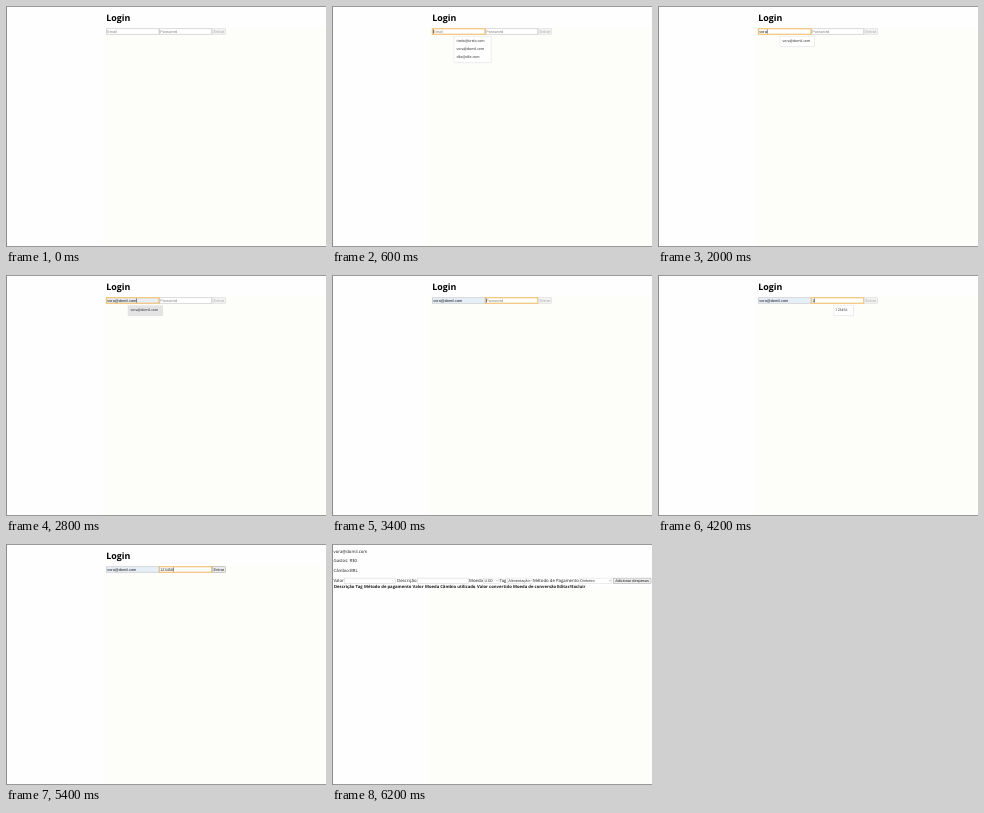
These frames come from a looping animation (320x241 px, 8000 ms). An HTML page:

```html
<!DOCTYPE html>
<html lang="pt">
<head>
<meta charset="utf-8">
<title>Login</title>
<style>
html, body { margin: 0; width: 100%; height: 100%; overflow: hidden; background: #fefefe; }
svg { display: block; width: 100vw; height: 100vh; }
text { white-space: pre; text-rendering: geometricPrecision; }
.ui { font-family: "Open Sans", "Noto Sans", sans-serif; }
.field { font-family: "Liberation Sans", Arial, sans-serif; }
</style>
</head>
<body>
<svg id="stage" viewBox="0 0 320 241" preserveAspectRatio="none"></svg>
<script>
const LOOP = 8000;
const EMAIL = "vora@domil.com";
const PASS = "123456";
const OTHERS = ["tirelo@tirelo.com", "dile@dile.com"];
const INK = "#1c1c1c", HINT = "#858585", LINE = "#b4b4b4";
const FIELD = 3.87, BODY = 4.3;
const stage = document.getElementById("stage");

function add(parent, tag, attrs, content) {
  const el = document.createElementNS("http://www.w3.org/2000/svg", tag);
  for (const k in attrs) el.setAttribute(k, attrs[k]);
  if (content) el.textContent = content;
  return parent.appendChild(el);
}
const group = parent => add(parent, "g", {});
const box = (p, x, y, width, height, fill, stroke = "none", sw = 0.5) =>
  add(p, "rect", { x, y, width, height, fill, stroke, "stroke-width": sw });
const label = (p, x, y, size, str, fill = INK, weight = 400, cls = "ui") =>
  add(p, "text", { x, y, class: cls, "font-size": size, "font-weight": weight, fill }, str);
const fieldText = (p, x, y, str, fill = INK) => label(p, x, y, FIELD, str, fill, 400, "field");
const show = (el, on) => el.setAttribute("visibility", on ? "inherit" : "hidden");
const style = (el, attrs) => { for (const k in attrs) el.setAttribute(k, attrs[k]); };

// Page
box(stage, 0, 0, 320, 241, "#fefefe");
box(stage, 97, 46, 223, 194, "#fdfdf9");
const login = group(stage), wallet = group(stage);
box(stage, 0, 0, 320, 1, "#999");
box(stage, 0, 240, 320, 1, "#999");
box(stage, 0, 0, 1, 241, "#8c8c8c");

// Login form
box(login, 97, 22, 223, 24, "#fdfdf9");
label(login, 100.2, 14.6, 8.87, "Login", "#000", 700);

function input(x, width, hint) {
  const frame = box(login, x, 22.8, width, 5.4, "#fff", LINE);
  const text = fieldText(login, x + 1, 26.9, "");
  const caret = box(login, 0, 23.5, 0.5, 4, "#111");
  return (value, focused, filled) => {
    text.textContent = value || hint;
    text.setAttribute("fill", value ? INK : HINT);
    style(frame, {
      fill: filled ? "#e6eff8" : "#fff",
      stroke: focused ? "#efb04a" : LINE,
      "stroke-width": focused ? 0.9 : 0.5
    });
    show(caret, focused);
    caret.setAttribute("x", x + 1 + (value ? text.getComputedTextLength() + 0.1 : -0.2));
  };
}
const setPass = input(153.2, 52.6, "Password");
const setEmail = input(100.3, 52.7, "Email");

const button = box(login, 206.2, 22.8, 13.3, 5.4, "#f0f0f0", "#d0d0d0");
const buttonText = fieldText(login, 207.6, 26.9, "Entrar");

function menu(x, width, rows, size) {
  const g = group(login);
  const height = rows.length * 8 + 2;
  box(g, x + 0.4, 31.1, width, height, "#e9e9e9");
  const face = box(g, x, 30.6, width, height, "#fff", "#dedede", 0.4);
  rows.forEach((row, i) => label(g, x + 2.5, 36.4 + i * 8, size, row));
  return { g, face };
}
const allMenu = menu(122, 37, [OTHERS[0], EMAIL, OTHERS[1]], 3.53);
const oneMenu = menu(122, 34.6, [EMAIL], 3.53);
const passMenu = menu(175.2, 20, [PASS], 3.4);

// Expenses page
label(wallet, 1.5, 8.8, BODY, EMAIL);
label(wallet, 1.5, 18.3, BODY, "Gastos: R$0");
label(wallet, 1.5, 28, BODY, "Câmbio:BRL");
[[1.5, "Valor"], [65, "Descrição"], [137, "Moeda"], [167.6, "Tag"], [201, "Método de Pagamento"]]
  .forEach(([x, str]) => label(wallet, x, 38, BODY, str));

for (const x of [12.6, 85.6]) box(wallet, x, 34.1, 51, 5.2, "#fff", "#c4c4c4", 0.4);

[[151.6, 15.4, "USD"], [175.3, 25, "Alimentação"], [247.3, 32.6, "Dinheiro"]].forEach(([x, w, str]) => {
  box(wallet, x, 34.1, w, 5.2, "#fff", "#d2d2d2", 0.4);
  fieldText(wallet, x + 1, 38, str, "#333");
  const cx = x + w - 1.7;
  add(wallet, "path", { d: `M${cx - 0.8} 36.3l.8 .8l.8-.8`, fill: "none", stroke: "#333", "stroke-width": 0.4 });
});
box(wallet, 281.2, 34.1, 37.8, 5.2, "#efefef", "#8c8c8c", 0.4);
fieldText(wallet, 283.2, 38, "Adicionar despesas");

[[2, "Descrição"], [23.6, "Tag"], [32, "Método de pagamento"], [80.6, "Valor"], [93, "Moeda"],
 [108.2, "Câmbio utilizado"], [145, "Valor convertido"], [181, "Moeda de conversão"], [225, "Editar/Excluir"]]
  .forEach(([x, str]) => label(wallet, x, 44.4, 4.21, str, INK, 700));

// Typing runs one key per 200 ms
const typed = (t, start) => Math.max(0, Math.floor((t - start) / 200) + 1);

function render(t) {
  const done = t >= 6200, picked = t >= 2800, onPass = t >= 3200;
  show(login, !done);
  show(wallet, done);
  if (done) return;

  const keys = t < 1600 ? 0 : Math.min(4, typed(t, 1600) + 1);
  setEmail(EMAIL.slice(0, picked ? EMAIL.length : keys), t >= 600 && !onPass, picked);
  const digits = Math.min(PASS.length, typed(t, 4200));
  setPass(PASS.slice(0, digits), onPass, false);

  show(allMenu.g, t >= 600 && t < 1600);
  show(oneMenu.g, t >= 1600 && t < 3400);
  oneMenu.g.setAttribute("opacity", onPass ? 0.35 : 1);
  oneMenu.face.setAttribute("fill", picked ? "#e4e4e4" : "#fff");
  show(passMenu.g, t >= 4200 && t < 5400);

  const ready = digits === PASS.length;
  style(button, { fill: ready ? "#efefef" : "#f3f3f3", stroke: ready ? "#909090" : "#cfcfcf" });
  buttonText.setAttribute("fill", ready ? INK : "#a8a8a8");
}

function tick() {
  render(performance.now() % LOOP);
  requestAnimationFrame(tick);
}
tick();
</script>
</body>
</html>
```
